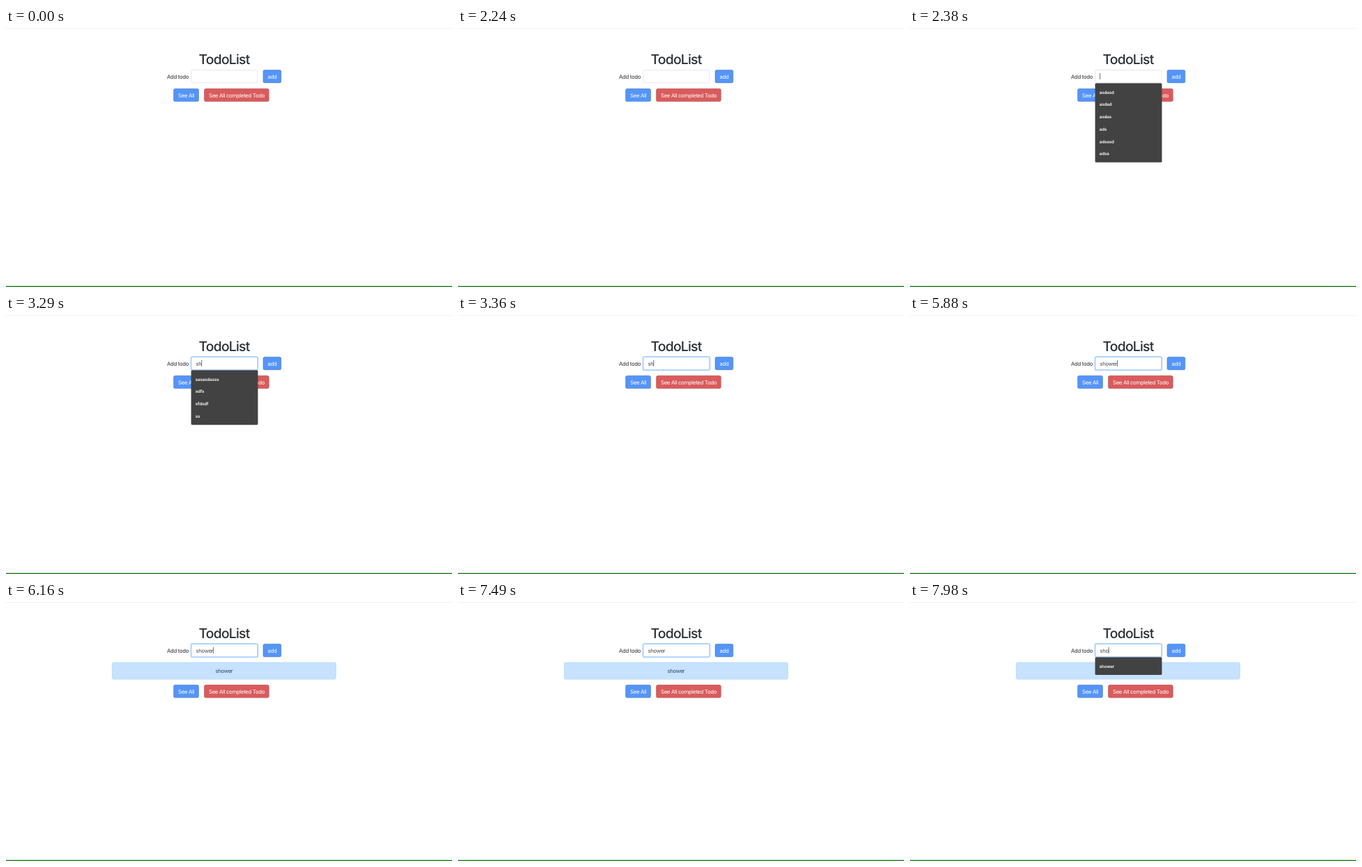
These frames come from a looping animation (640 by 373 pixels, 8000 ms). An HTML page:

```html
<!DOCTYPE html>
<html lang="en">
<head>
<meta charset="utf-8">
<title>Todo list</title>
<style>
  html, body { margin: 0; width: 100%; height: 100%; overflow: hidden; background: #fff; }
  svg { display: block; width: 640px; height: 373px; }
  text {
    font: 400 7.76px Inter, "Liberation Sans", sans-serif;
    font-optical-sizing: none;
    letter-spacing: -.04em;
    text-rendering: geometricPrecision;
    fill: #2b2e31;
    white-space: pre;
  }
  .mid { text-anchor: middle; }
  .title { font-size: 19.4px; font-weight: 500; }
  .button text { fill: #fff; text-anchor: middle; }
  .button rect { stroke-width: .6; }
  .blue rect { fill: #5595f8; stroke: #4a7cc8; }
  .red rect { fill: #da5b5c; stroke: #ae4a4c; }
  .field { fill: #fff; stroke: #d3d8dd; stroke-width: .6; }
  .glow { fill: none; stroke: #bfdeff; stroke-width: 1.5; }
  .focus { fill: none; stroke: #80bdff; stroke-width: .6; }
  #typed { fill: #495057; }
  #caret { fill: #333; }
  .alert rect { fill: #c7e2fe; stroke: #b3d4f4; stroke-width: .6; }
  .alert text { fill: #2c4a70; text-anchor: middle; }
  #menu rect { fill: #424242; }
  #menu text { fill: #fff; font-size: 6.2px; font-weight: 600; letter-spacing: -.02em; }
</style>
</head>
<body>
<svg viewBox="0 0 640 373">
  <rect width="640" height="373" fill="#fff"/>
  <rect width="640" height=".5" fill="#e4e4e4"/>
  <rect y="371.6" width="640" height="1.4" fill="#1b7d1b"/>

  <text class="title mid" x="313" y="52">TodoList</text>
  <text x="231" y="72.7">Add todo</text>
  <rect class="field" x="266" y="60.6" width="94.8" height="18.3" rx="2"/>
  <g id="ring">
    <rect class="glow" x="265.1" y="59.7" width="96.6" height="20.1" rx="2.6"/>
    <rect class="focus" x="266" y="60.6" width="94.8" height="18.3" rx="2"/>
  </g>
  <text id="typed" x="272.5" y="72.8"></text>
  <rect id="caret" y="65" width=".7" height="9"/>

  <g class="button blue">
    <rect x="369" y="60.6" width="25.8" height="18.3" rx="2"/>
    <text x="382" y="72.8">add</text>
  </g>

  <g id="row" class="alert">
    <rect x="152.4" y="87" width="321" height="24.2" rx="2"/>
    <text x="313" y="101.8">shower</text>
  </g>

  <g id="filters">
    <g class="button blue">
      <rect x="240.6" y="87.5" width="35.9" height="18.3" rx="2"/>
      <text x="258.6" y="99.7">See All</text>
    </g>
    <g class="button red">
      <rect x="284.6" y="87.5" width="92.6" height="18.3" rx="2"/>
      <text x="331" y="99.7">See All completed Todo</text>
    </g>
  </g>

  <g id="menu"></g>
</svg>

<script>
const LOOP = 8000, FOCUS = 2380, ADDED = 6160;
const ITEM = 17.7;

const keys = [
  [0, ""], [2660, "s"], [3220, "sh"], [3430, "sho"], [4480, "sh"],
  [4970, "sho"], [5180, "show"], [5390, "showe"], [5670, "shower"],
  [7560, "showe"], [7770, "show"], [7980, "sho"]
];
const menus = [
  [0, ""],
  [FOCUS, "asdasd asdad asdas ads adsasd adsa"],
  [2730, "sasasdasss sdfs sfdsdf ss"],
  [3360, ""],
  [7700, "shower"]
];
const caretOff = [[0, FOCUS], [3920, 4480], [6230, 6720], [7280, 7560]];

const el = id => document.getElementById(id);
const [ring, typed, caret, row, filters, menu] =
  ["ring", "typed", "caret", "row", "filters", "menu"].map(el);

// Latest value whose start time has passed
const at = (list, t) => list.filter(([start]) => start <= t).pop()[1];
const show = (node, on) => node.setAttribute("visibility", on ? "visible" : "hidden");

function menuMarkup(words) {
  if (!words) return "";
  const items = words.split(" ");
  const box = `<rect x="265.6" y="79.6" width="95.9" height="${items.length * ITEM + 7.8}" rx="1.6"/>`;
  return box + items.map((word, i) =>
    `<text x="271.8" y="${94.7 + i * ITEM}">${word}</text>`).join("");
}

let shownMenu = "";

function draw(t) {
  const value = at(keys, t);
  if (typed.textContent !== value) typed.textContent = value;
  const width = value ? typed.getComputedTextLength() : 0;
  caret.setAttribute("x", 272.4 + width);
  show(caret, !caretOff.some(([from, to]) => t >= from && t < to));

  ring.setAttribute("opacity", Math.min(1, Math.max(0, (t - FOCUS) / 140)));

  const added = t >= ADDED;
  show(row, added);
  filters.setAttribute("transform", `translate(0 ${added ? 32 : 0})`);

  const words = at(menus, t);
  if (words !== shownMenu) {
    menu.innerHTML = menuMarkup(words);
    shownMenu = words;
  }
}

const begin = performance.now();
function tick() {
  draw((performance.now() - begin) % LOOP);
  requestAnimationFrame(tick);
}
tick();
</script>
</body>
</html>
```
